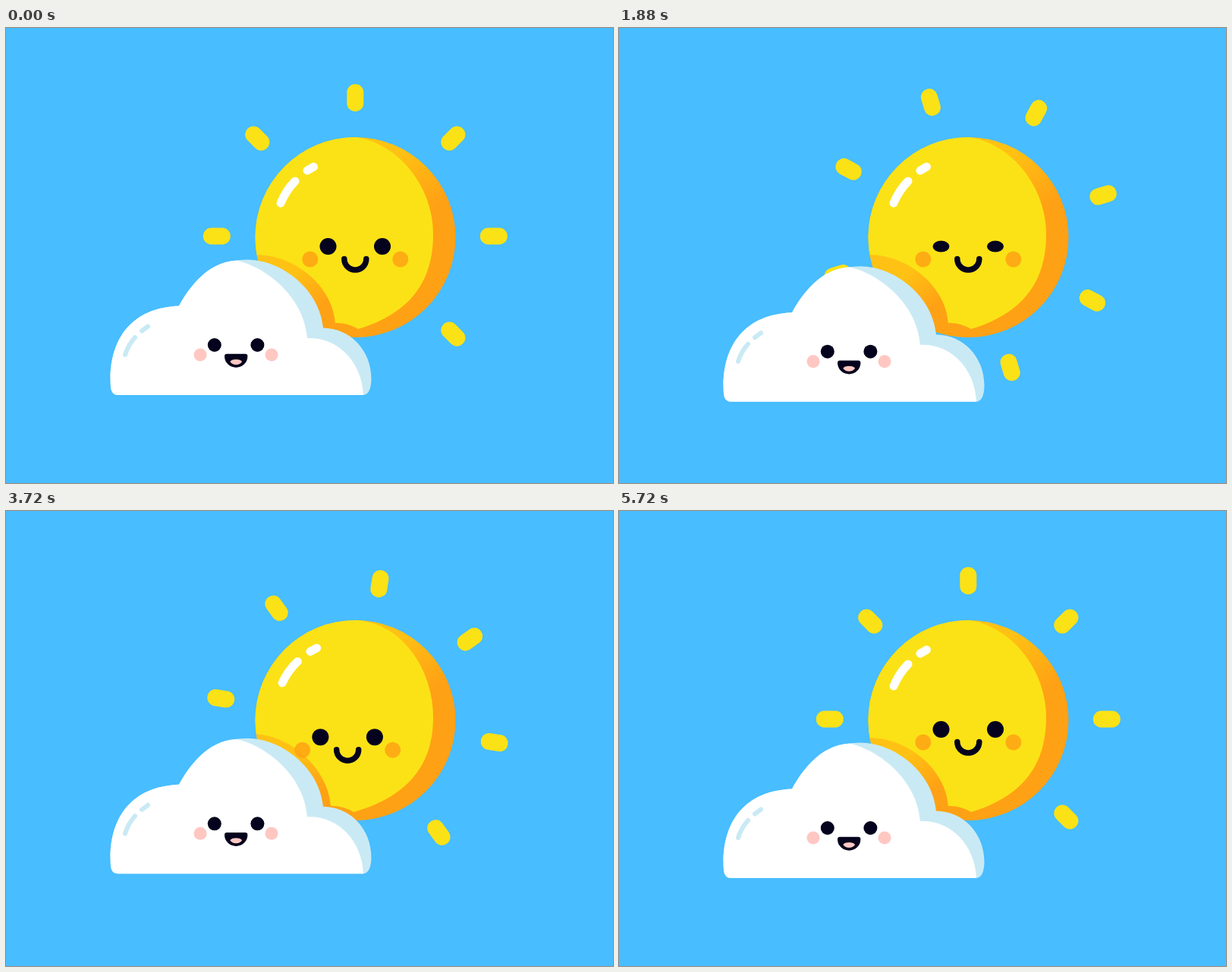
An HTML page that plays this animation: 800x600 px, repeating every 5760 ms.

```html
<!DOCTYPE html>
<html>
<head>
<meta charset="utf-8">
<title>Sun and cloud</title>
<style>
  html, body { margin: 0; width: 100%; height: 100%; overflow: hidden; background: #48bdff; }
  svg { display: block; width: 800px; height: 600px; }
  .line { fill: none; stroke-linecap: round; }
</style>
</head>
<body>
<svg viewBox="0 0 800 600">
  <defs>
    <clipPath id="disc"><circle cx="460.5" cy="276" r="132"/></clipPath>
    <linearGradient id="rim" gradientUnits="userSpaceOnUse" x1="515" y1="165" x2="563" y2="235">
      <stop stop-color="#ffc214"/><stop offset="1" stop-color="#ffa114"/>
    </linearGradient>
    <linearGradient id="cast" gradientUnits="userSpaceOnUse" x1="382" y1="320" x2="420" y2="364">
      <stop stop-color="#ffc214"/><stop offset="1" stop-color="#ffa114"/>
    </linearGradient>
  </defs>

  <g id="rays" fill="#fbe216"></g>

  <g clip-path="url(#disc)">
    <rect x="320" y="140" width="280" height="280" fill="url(#rim)"/>
    <rect x="320" y="285" width="120" height="130" fill="url(#cast)"/>
    <path id="lit" fill="#fbe216"/>
  </g>
  <path id="shine" class="line" stroke="#fff" stroke-width="11" d="M362 231Q369 214 381 202M397 188L405.5 183"/>
  <g id="sunFace" fill="#04021c">
    <g fill="#ff9f14" fill-opacity=".8">
      <circle cx="400.8" cy="305" r="10.5"/><circle cx="519.8" cy="305" r="10.5"/>
    </g>
    <ellipse class="sunEye" cx="424.5" cy="288" rx="11" ry="11"/>
    <ellipse class="sunEye" cx="496" cy="288" rx="11" ry="11"/>
    <path class="line" stroke="#04021c" stroke-width="7.5" d="M445.8 304.5a14.5 14.5 0 0 0 29 0"/>
  </g>

  <g id="cloud">
    <path fill="#c9eaf4" d="M148 484Q139 484 138 474C134 416 161 369 228 366.5C241 342 269 305.5 318 305.5C366 306 414 347 418 395.5C453 396 481.5 424 481.5 463Q481 484 470 484Z"/>
    <path fill="#fff" d="M148 484Q139 484 138 474C134 416 161 369 228 366.5C241 342 266 308 304 306.5C342 315 393 354 397 409C437 407 469 440 471 484Z"/>
    <path class="line" stroke="#c9eaf4" stroke-width="6" d="M157 431Q161 418 170 408M179 399.5L187 393.5"/>
    <g fill="#ffc7c2">
      <circle cx="256" cy="431" r="8.5"/><circle cx="350" cy="431" r="8.5"/>
    </g>
    <g fill="#04021c">
      <ellipse class="cloudEye" cx="274.8" cy="418" rx="9" ry="9"/>
      <ellipse class="cloudEye" cx="331.4" cy="418" rx="9" ry="9"/>
      <path d="M291 429.7h24.4q3 0 3 3a15.2 15 0 0 1-30.4 0q0-3 3-3z"/>
    </g>
    <path fill="#ffc7c2" d="M295.3 440Q297 437 303.2 437Q309.4 437 311.1 440Q308.5 444 303.2 444Q298 444 295.3 440Z"/>
  </g>
</svg>
<script>
const LOOP = 5760, STEP = 40, TURN = LOOP - STEP;
const $ = id => document.getElementById(id);

// Eight equal rays on a ring, slightly off its pivot.
const RAYS = 8, RADIUS = 182.5;
$('rays').innerHTML = Array.from({ length: RAYS }, (_, i) =>
  `<rect x="-11" y="-18" width="22" height="36" rx="10.7"
    transform="translate(-2 0) rotate(${i * 360 / RAYS}) translate(0 ${-RADIUS})"/>`).join('');

const clamp = v => Math.max(0, Math.min(1, v));
const ease = v => { v = clamp(v); return v * v * (3 - 2 * v); };
const mix = (a, b, k) => a + (b - a) * k;

// Cloud drift: down, up past its rest height, and back.
function drift(t) {
  const low = 1920, high = 4000, down = 8.9, up = -8;
  if (t < low) return down * t / low;
  if (t < high) return mix(down, up, (t - low) / (high - low));
  return up * (TURN - t) / (TURN - high);
}

// Eye openness, shut at each given moment.
const blink = (t, ...moments) =>
  Math.min(...moments.map(m => mix(.1, 1, clamp(Math.abs(t - m) / 125))));

function setEyes(name, r, open) {
  for (const e of document.getElementsByClassName(name)) e.setAttribute('ry', r * open);
}

// Lit part of the sun; its edge shifts as the head turns by k.
const litPath = k =>
  `M${462 + 12 * k} 130V${144 + 2 * k}C${515 + 7 * k} 152 563 207 563 272` +
  `C563 341 ${526 - 3 * k} 378 ${464 - 7 * k} 397` +
  `q-15 -9 -30 -8c-3 -46 -50 ${-89 - 6 * k} -103 ${-90 - 6 * k}H300V130Z`;

function draw(t) {
  const move = (id, transform) => $(id).setAttribute('transform', transform);
  const look = ease((t - 2080) / 480) - ease((t - 3600) / 480);
  move('rays', `translate(462.3 274.5) rotate(${360 * t / TURN})`);
  move('shine', `rotate(${3 * look} 460.5 276)`);
  move('sunFace', `translate(${-12 * look} ${12 * look})`);
  move('cloud', `translate(0 ${drift(t)})`);
  $('lit').setAttribute('d', litPath(look));
  setEyes('sunEye', 11, blink(t, 1960, 4920));
  setEyes('cloudEye', 9, blink(t, 4280));
}

const start = performance.now();
function tick() {
  const t = (performance.now() - start) % LOOP;
  draw(Math.floor(t / STEP) * STEP);
  requestAnimationFrame(tick);
}
tick();
</script>
</body>
</html>
```
